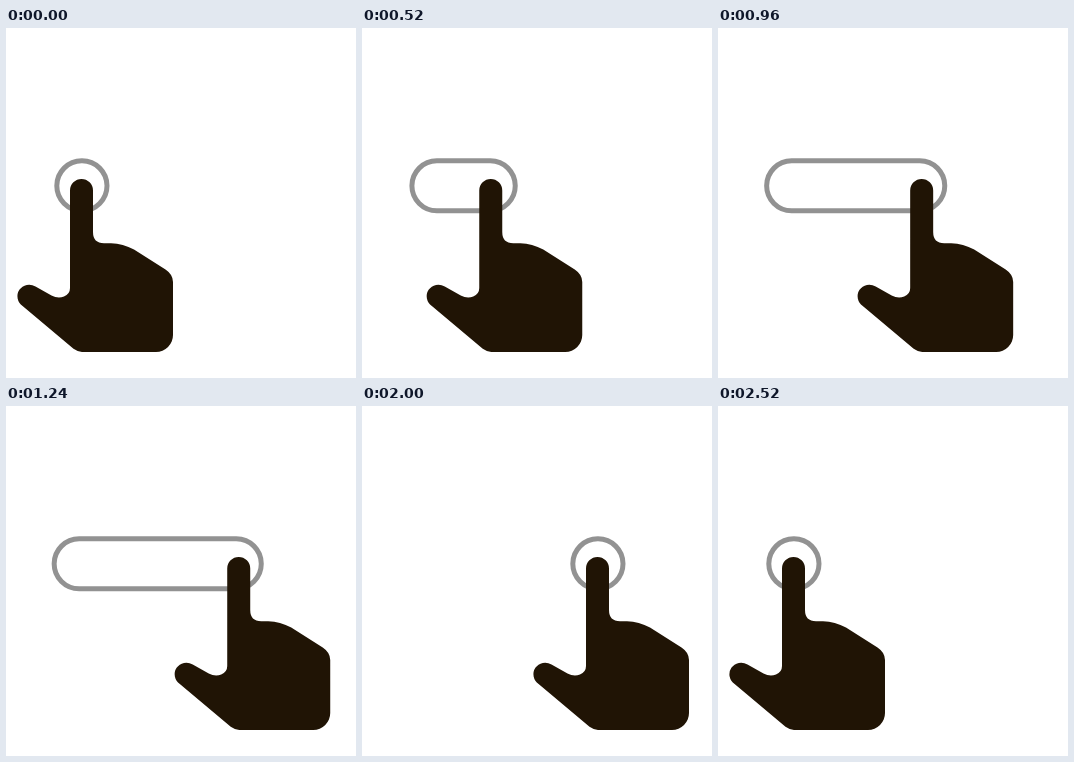
Recreate the animation shown at these times as an HTML page. Size 350 px wide and 350 px high, loop 2680 ms.

```html
<!DOCTYPE html>
<html lang="en">
<head>
<meta charset="utf-8">
<title>Swipe gesture</title>
<style>
  html, body { margin: 0; width: 100%; height: 100%; overflow: hidden; background: #fff; }
  svg { display: block; width: 100vw; height: 100vh; }
</style>
</head>
<body>
<svg viewBox="0 0 350 350">
  <rect id="trail" y="132.8" height="50" rx="25" fill="none" stroke="#929292" stroke-width="5"/>
  <path id="hand" fill="#201405" d="M64 162.5a11.5 11.5 0 0 1 23 0V204Q87 215.2 98 215.2H105Q117 215.5 128 221.5L159.5 241.5Q167 246.5 167 254V307A17 17 0 0 1 150 324H76Q72 324 67.5 320.8L16.6 278A11.5 11.5 0 0 1 29.5 258.6L45.5 267.5Q52 271 58 268.5Q64 266 64 260Z"/>
</svg>
<script>
  const LOOP = 2680, STEP = 40;
  const SWIPE_END = 1345, SHRINK_END = 2000, RETURN_END = 2520;
  const TRAVEL = 160, LEFT = 50.8, RIGHT = 101;
  const trail = document.getElementById('trail');
  const hand = document.getElementById('hand');

  const progress = (t, from, to) => Math.min(1, Math.max(0, (t - from) / (to - from)));
  const ease = u => u * u * (3 - 2 * u);

  function draw(now) {
    const t = Math.floor((now % LOOP) / STEP) * STEP;
    const swipe = ease(progress(t, 0, SWIPE_END));
    const shrink = ease(progress(t, SWIPE_END, SHRINK_END));
    const back = progress(t, SHRINK_END, RETURN_END) * TRAVEL;

    // The trail drifts slightly left while stretching, then catches up.
    const left = LEFT - 2.7 * swipe + (TRAVEL + 2.7) * shrink - back;
    const right = RIGHT + 157 * swipe + 3 * shrink - back;
    trail.setAttribute('x', left);
    trail.setAttribute('width', right - left);
    hand.setAttribute('transform', `translate(${TRAVEL * swipe - back} 0)`);
    requestAnimationFrame(draw);
  }
  draw(0);
</script>
</body>
</html>
```
